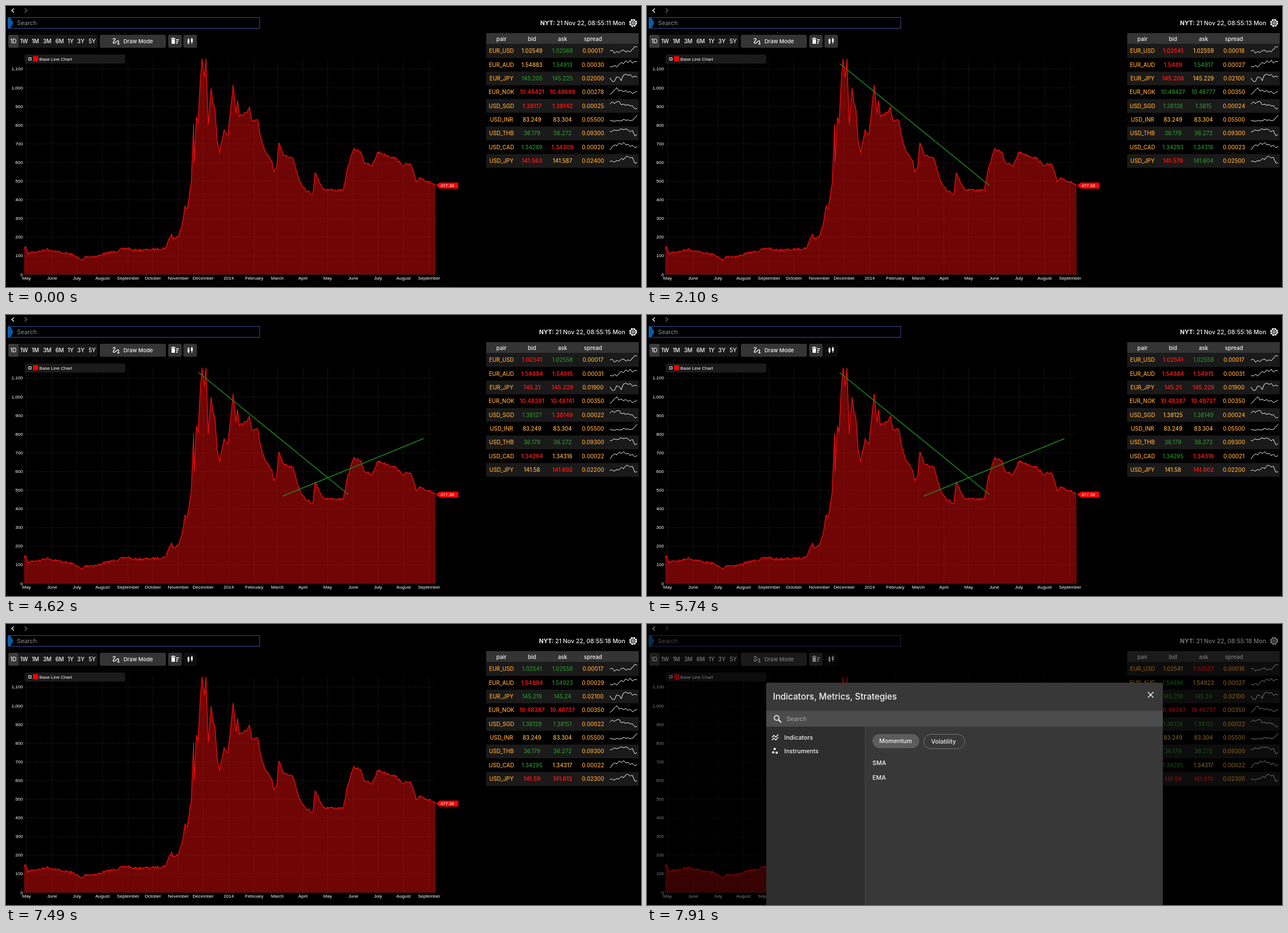
Recreate the animation shown at these times as an HTML page. Size 1124 px wide and 498 px high, loop 8000 ms.

```html
<!DOCTYPE html>
<html lang="en">
<head>
<meta charset="utf-8">
<title>Chart drawing</title>
<style>
html, body { margin: 0; width: 100%; height: 100%; overflow: hidden; background: #000; }
svg { display: block; width: 100vw; height: 100vh; }
text { font: 500 9.7px Inter, sans-serif; fill: #f2f2f2; dominant-baseline: central; white-space: pre; }
.axis { font: 8.1px "Liberation Sans", Arial, sans-serif; fill: #fff; }
.mid { text-anchor: middle; }
.end { text-anchor: end; }
.icon { fill: none; stroke: #fff; stroke-width: 1.3; }
</style>
</head>
<body>
<svg id="stage" viewBox="0 0 1124 498" preserveAspectRatio="none"></svg>
<script>
const LOOP = 8000, STEP = 70;
const stage = document.getElementById('stage');

function add(tag, attrs, parent = stage) {
  const node = document.createElementNS('http://www.w3.org/2000/svg', tag);
  for (const key in attrs) node.setAttribute(key, attrs[key]);
  return parent.appendChild(node);
}
const rect = (x, y, x2, y2, fill, rx = 0, parent) =>
  add('rect', { x, y, width: x2 - x, height: y2 - y, fill, rx }, parent);
const path = (d, attrs, parent) => add('path', { d, ...attrs }, parent);
const icon = (d, parent, attrs) => path(d, { class: 'icon', ...attrs }, parent);
function text(x, y, label, size, attrs = {}, parent) {
  const node = add('text', { x, y, ...attrs }, parent);
  if (size) node.style.fontSize = size + 'px';
  node.textContent = label;
  return node;
}

let seed = 7;
const random = () => (seed = (seed * 16807) % 2147483647) / 2147483647;
// Joins the points with short, slightly uneven steps.
function rough(points, step, amount) {
  const out = [points[0]];
  for (let i = 1; i < points.length; i++) {
    const [x0, y0] = points[i - 1], [x1, y1] = points[i];
    const n = Math.max(1, Math.round((x1 - x0) / step));
    for (let k = 1; k <= n; k++) {
      const jitter = k < n ? (random() - .5) * amount : 0;
      out.push([x0 + (x1 - x0) * k / n, y0 + (y1 - y0) * k / n + jitter]);
    }
  }
  return out.map(([x, y]) => x.toFixed(1) + ',' + y.toFixed(1)).join(' ');
}

// Header
icon('M14 4.5L10 8l4 3.5', stage, { 'stroke-width': 1.6 });
icon('M33 4.5L37 8l-4 3.5', stage, { stroke: '#666', style: 'stroke:#666' });
add('rect', { x: 4.5, y: 20.5, width: 444.5, height: 19, fill: '#000', stroke: '#3d4b9b' });
path('M3 20h4.5l5.5 10-5.5 10H3z', { fill: '#0b5aa5' });
text(19.5, 30, 'Search', 10.5, { style: 'fill:#8e8e8e;font-weight:400' });

const clock = text(1096, 30, '', 10.5, { class: 'end' });
const zone = add('tspan', { 'font-weight': 700 }, clock);
zone.textContent = 'NYT:';
const moment = add('tspan', {}, clock);
add('circle', { cx: 1110, cy: 30, r: 4.9, class: 'icon', style: 'stroke-width:1.5' });
add('circle', { cx: 1110, cy: 30, r: 6.2, class: 'icon', style: 'stroke-width:1.7', 'stroke-dasharray': '2.9 1.97' });
add('circle', { cx: 1110, cy: 30, r: 2, class: 'icon' });

// Toolbar
rect(4, 51, 162, 74, '#191919', 3);
rect(4, 51, 22, 74, '#3a3a3a', 3);
['1D', '1W', '1M', '3M', '6M', '1Y', '3Y', '5Y'].forEach((label, i) =>
  text([13, 32, 52, 73, 95, 114.5, 132.5, 152.5][i], 62.5, label, 9.8, { class: 'mid' }));
rect(166, 51, 283, 74, '#343434', 3);
icon('M189 59c3-3 6-1 3 2s-3 6 0 5 5-6 7-4-2 5-1 5.500 2 0 3-1');
text(208, 62.5, 'Draw Mode', 9.5, { 'font-weight': 600 });
const trash = rect(287, 51, 311, 74, '#343434', 3);
path('M293 59h6v8h-6zM292 57h8v1.200h-8zM294.500 56h3v1h-3zM301 59h5v1.400h-5zM301 62h4v1.400h-4zM301 65h3v1.400h-3z', { fill: '#fff' });
const candle = rect(314, 51, 338, 74, '#343434', 3);
path('M321.500 59h3v7h-3zM327.500 58h3v6h-3zM322.500 57h1v11h-1zM328.500 56h1v11h-1z', { fill: '#fff' });

// Chart
const BASE = 476;
const monthX = i => 36.5 + 1.46 * (Date.UTC(2013, 4 + i) - Date.UTC(2013, 4)) / 864e5;
const grid = { stroke: '#fff', 'stroke-opacity': .16, 'stroke-width': .8, 'stroke-dasharray': '2 2', fill: 'none' };
for (let v = 0; v < 12; v++) {
  const y = BASE - v * 33.1;
  path(`M32 ${y}H760`, grid);
  text(30, y, (v * 100).toLocaleString('en-US'), 0, { class: 'axis end' });
}
const months = ['January', 'February', 'March', 'April', 'May', 'June', 'July', 'August',
  'September', 'October', 'November', 'December'];
for (let i = 0; i < 17; i++) {
  const m = (i + 4) % 12;
  path(`M${monthX(i)} 94V${BASE}`, grid);
  text(monthX(i), 482, m ? months[m] : '2014', 0, { class: 'axis mid' });
}
rect(33, 86, 211, 102, '#1b1b1b', 3);
add('rect', { x: 40.2, y: 91.7, width: 4.2, height: 4.2, class: 'icon', style: 'stroke-width:1' });
rect(48, 89, 57, 98, '#f00', 1);
text(59, 94, 'Base Line Chart', 0, { class: 'axis' });

const price = `32,431 35,427 39,440 44,436 60,435 72,431 98,437 120,441 134,451 141,444 160,444 171,440
  216,429 224,433 258,432 282,429 287,417 293,404 296,413 306,407 312,385 317,354 321,359 328,312
  332,210 333,277 337,197 340,208 344,130 347,94 351,126 354,94 358,210 363,146 366,170 370,184
  374,241 378,260 386,219 393,228 402,140 407,190 410,168 413,196 427,188 431,179 435,203 446,203
  451,233 458,257 471,276 474,294 479,287 483,243 490,262 508,270 519,308 530,326 543,334 547,296
  562,325 597,327 604,289 615,254 628,258 634,277 648,284 658,259 690,270 700,281 717,281 726,312
  732,304 760,317`.split(/\s+/).map(p => p.split(',').map(Number));
const curve = rough(price, 1.5, 4.4);
path(`M32 ${BASE}L${curve}L760.500 ${BASE}z`, { fill: '#ff0d0d', 'fill-opacity': .44 });
path('M' + curve, { fill: 'none', stroke: '#e60d0d', 'stroke-width': 1.4, 'stroke-linejoin': 'round' });
path('M761 318l7-5h32.500v10.500H768z', { fill: '#f00' });
text(781, 318.3, '477.38', 7.9, { class: 'axis mid' });

const trend = () => add('line', { stroke: '#1c8a1c', 'stroke-width': 1.5 });
const falling = trend(), rising = trend();

// Quotes: "time bid ask", each price marked y (same), g (up) or r (down)
const quotes = {
  EUR_USD: '0 1.02549y 1.02566g|1680 1.02541r 1.02559y|2450 1.02541y 1.02559y|4200 1.02541r 1.02558g|5950 1.0254r 1.02557y|7000 1.02541g 1.02558g|7700 1.02541y 1.02557r',
  EUR_AUD: '0 1.54883y 1.54913g|1260 1.5489r 1.54917g|2660 1.54889g 1.54917g|4200 1.54884r 1.54915r|5950 1.54891g 1.54915y|7000 1.54894r 1.54923g|7910 1.54896g 1.54923y',
  EUR_JPY: '0 145.205g 145.225g|1680 145.208r 145.229y|2450 145.209g 145.228y|4200 145.21r 145.229r|5950 145.217g 145.237g|7000 145.219g 145.24g',
  EUR_NOK: '0 10.48421r 10.48699r|1680 10.48427g 10.48777g|2660 10.48391r 10.48741r|5040 10.48387r 10.48737r',
  USD_SGD: '0 1.38117r 1.38142r|1680 1.38126g 1.3815g|3500 1.38127g 1.38149r|5040 1.38125y 1.38149g|7000 1.38129g 1.38151g',
  USD_INR: '0 83.249y 83.304y',
  USD_THB: '0 36.179g 36.272g',
  USD_CAD: '0 1.34289g 1.34309r|1260 1.34293g 1.34316g|3150 1.34294r 1.34316y|5040 1.34295g 1.34316r|6090 1.34295y 1.34316y|7000 1.34295g 1.34317y',
  USD_JPY: '0 141.563r 141.587y|1680 141.579r 141.604g|3150 141.58y 141.604y|4200 141.58y 141.602r|6230 141.591g 141.611g|7000 141.59r 141.613r'
};
const sparks = [
  '0 -1 4 1 3 0 -2 2 0 1 -3 -8 -7', '4 4 1 4 0 -4 -2 -7 -4 -8 -3 -6 -5',
  '-1 5 5 -3 -2 4 -6 -8 -6 -7 -2 -4 -3', '4 1 -4 -8 -2 -4 -1 -3 0 -1 3 0 -2',
  '-3 -7 -4 -7 -8 -2 -3 -1 -2 0 0 5 4', '1 2 3 1 2 2 0 1 0 2 1 -3 -8',
  '-3 -4 -6 -5 -6 -8 -7 -8 -6 -3 -5 4 2', '5 -1 -4 -2 -7 -5 -8 -4 -5 -1 -3 1 -1',
  '1 0 2 -1 0 -4 -2 -7 -8 -5 -6 4 3'
];
const COLUMNS = [877, 931, 985, 1039], ORANGE = '#ffa62e';
const MARKS = { y: ['#ffb545', 500], g: ['#2a932a', 500], r: ['#e01818', 700] };
rect(850, 48, 1120, 67.5, '#343434');
['pair', 'bid', 'ask', 'spread'].forEach((label, i) => text(COLUMNS[i], 58, label, 9.7, { class: 'mid' }));
const rows = Object.entries(quotes).map(([pair, history], i) => {
  const y = 79.7 + i * 24.35;
  if (i % 2 === 0) rect(850, y - 12.2, 1120, y + 12.2, '#1a1a1a');
  const cells = COLUMNS.map(x => text(x, y, pair, 9.7, { class: 'mid', style: `fill:${ORANGE}` }));
  const shape = sparks[i].split(' ').map((v, k) => [1069 + k * 4, y + Number(v)]);
  path('M' + rough(shape, 1.4, 1.6), { fill: 'none', stroke: '#fff', 'stroke-width': 1 });
  return { cells, history: history.split('|').map(entry => entry.split(' ')) };
});

// Tooltip
const tooltip = add('g', {});
rect(212, 82, 385, 100, '#616161', 3, tooltip).setAttribute('opacity', .94);
text(298.5, 91, 'Remove lines drawn on the current chart', 8.2, { class: 'mid' }, tooltip);

// Dialog
const dialog = add('g', {});
rect(0, 0, 1124, 498, 'rgba(0,0,0,.5)', 0, dialog);
rect(211, 104, 913, 510, '#383838', 3, dialog);
rect(211, 154, 913, 182, '#4c4c4c', 0, dialog);
rect(211, 182, 386, 498, '#2d2d2d', 0, dialog);
rect(385.500, 182, 386.500, 498, '#484848', 0, dialog);
text(223, 128.5, 'Indicators, Metrics, Strategies', 15.3, {}, dialog);
icon('M886.500 120.500l10 10m0-10l-10 10', dialog);
icon('M233 170l4.500 4.500', dialog, { style: 'stroke-width:2' });
add('circle', { cx: 229.5, cy: 166.5, r: 4.2, class: 'icon', style: 'stroke-width:1.6' }, dialog);
text(247, 168.5, 'Search', 10.7, { style: 'fill:#aaa;font-weight:400' }, dialog);
icon('M221 201l3.500-3.500 3.500 3 4.500-5M221 206l3.500-3.500 3.500 3 4.500-5', dialog);
[[226, 221.5], [223.5, 227.5], [229.5, 228]].forEach(([cx, cy]) =>
  add('circle', { cx, cy, r: 2.1, fill: '#fff' }, dialog));
rect(399, 195, 482, 220, '#5c5c5c', 12.5, dialog);
rect(490, 195.500, 562.500, 221, 'none', 12.7, dialog).setAttribute('stroke', '#777');
[[243, 201, 'Indicators'], [243, 225, 'Instruments'], [411, 207.5, 'Momentum'],
  [503, 208.5, 'Volatility'], [399, 246.5, 'SMA'], [399, 272.5, 'EMA']]
  .forEach(([x, y, label]) => text(x, y, label, 10.7, {}, dialog));

// Motion
const ramp = (t, from, to) => Math.min(1, Math.max(0, (t - from) / (to - from)));
const ease = p => p * p * (3 - 2 * p);
const between = (t, on, off, fade) => ramp(t, on, on + fade) - ramp(t, off, off + fade);

function placeLine(line, start, end, grown) {
  const [x1, y1] = start;
  const x2 = x1 + (end[0] - x1) * grown, y2 = y1 + (end[1] - y1) * grown;
  Object.entries({ x1, y1, x2, y2 }).forEach(([key, value]) => line.setAttribute(key, value));
  line.setAttribute('opacity', grown > 0 ? 1 : 0);
}
function hover(button, amount) {
  const level = Math.round(52 - 38 * amount);
  button.setAttribute('fill', `rgb(${level},${level},${level})`);
}
function showQuote({ cells, history }, t) {
  const [, ...prices] = history.filter(entry => Number(entry[0]) <= t).pop();
  prices.forEach((price, i) => {
    const [color, weight] = MARKS[price.slice(-1)], cell = cells[i + 1];
    cell.textContent = price.slice(0, -1);
    cell.style.fill = color;
    cell.style.fontWeight = weight;
  });
  cells[3].textContent = (parseFloat(prices[1]) - parseFloat(prices[0])).toFixed(5);
}

function render(t) {
  const drawn = t < 6720;
  placeLine(falling, [341, 102], [606, 316 + 2 * ramp(t, 1190, 1330)], drawn ? ease(ramp(t, 350, 770)) : 0);
  placeLine(rising, [490, 321], [739, 193 + 26 * ramp(t, 4130, 4270)], drawn ? ramp(t, 2100, 2310) : 0);
  hover(candle, between(t, 5600, 6090, 140) + ramp(t, 7210, 7350));
  hover(trash, between(t, 6090, 7000, 140));
  tooltip.setAttribute('opacity', between(t, 6300, 6930, 140));
  dialog.setAttribute('opacity', ease(ramp(t, 7490, 7770)));
  moment.textContent = ` 21 Nov 22, 08:55:${11 + Math.floor((t + 350) / 1050)} Mon`;
  rows.forEach(row => showQuote(row, t));
}

const began = performance.now();
function tick() {
  const t = (performance.now() - began) % LOOP;
  render(Math.floor(t / STEP) * STEP);
  requestAnimationFrame(tick);
}
tick();
</script>
</body>
</html>
```
